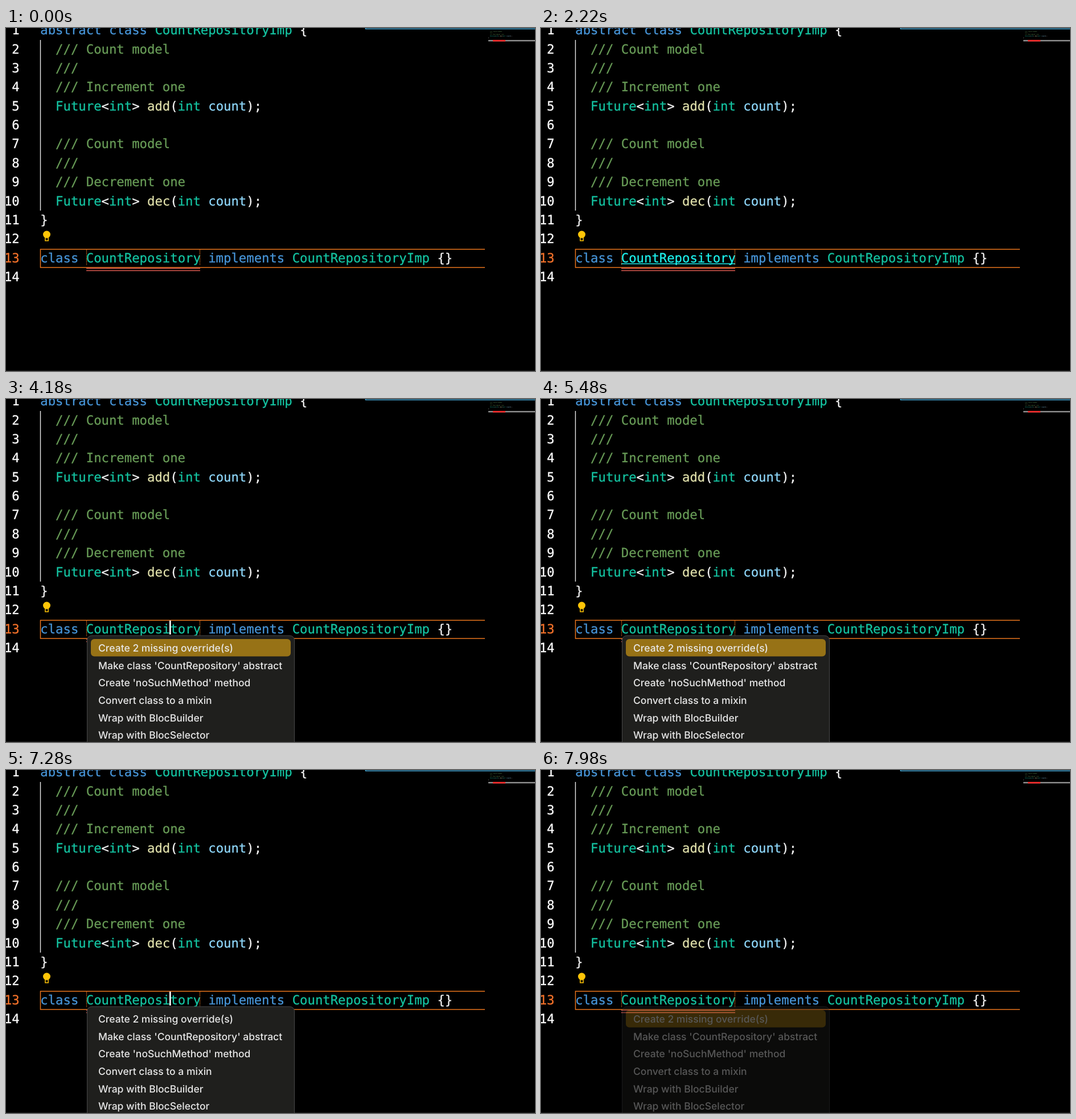
An HTML page that plays this animation: 929 px wide and 603 px high, repeating every 8 s.

```html
<!DOCTYPE html>
<html lang="en">
<head>
<meta charset="utf-8">
<title>Quick fix menu</title>
<style>
html, body { margin: 0; width: 100%; height: 100%; overflow: hidden; background: #000; }
svg { display: block; width: 929px; height: 603px; }
text { white-space: pre; text-rendering: geometricPrecision; }
text, tspan { fill: currentColor; }
.code, .mini { font-family: "DejaVu Sans Mono", monospace; color: #f2f2f2; }
.code { font-size: 22.28px; }
.code text, .code tspan { stroke: currentColor; stroke-width: .3px; }
.mini { font-size: 2.4px; }
.num { text-anchor: end; color: #fff; }
.num.current { color: #f5722a; }
.key { color: #4795d8; }
.type { color: #14c4a2; }
.note { color: #689c57; }
.func { color: #dfdfaa; }
.name { color: #8fd8fb; }
.link { color: #1df2ee; }
.items { font: 500 17.5px Inter, sans-serif; color: #e8e8e8; }

#plain, #link, #caret, #menu, #pick { animation: 8s step-end infinite; }
#plain { animation-name: plain; }
#link { animation-name: link; }
#caret { animation-name: blink; }
#menu { animation: menu 8s linear infinite; }
#pick { animation-name: flash; }

@keyframes plain { 0%, 33.75% { opacity: 1 } 5.25% { opacity: 0 } }
@keyframes link { 0%, 33.75% { opacity: 0 } 5.25% { opacity: 1 } }
@keyframes blink {
  0%, 21.6%, 56.5%, 91.6% { opacity: 0 }
  4.125%, 38.6%, 73.6% { opacity: 1 }
}
@keyframes menu {
  0%, 33.749% { opacity: 0 }
  33.75%, 93.6% { opacity: 1 }
  100% { opacity: .35 }
}
@keyframes flash { 0%, 92.5% { opacity: 1 } 90.1% { opacity: 0 } }
</style>
</head>
<body>
<svg viewBox="0 0 929 603">
  <rect width="929" height="603"/>
  <path d="M60.5 21V321" stroke="#e8e8e8" stroke-width="1.4"/>
  <path d="M631.5 0V1.5H929" fill="none" stroke="#48abd9" stroke-width="1.5"/>
  <path d="M0 602.5H929" stroke="#1c1c1c"/>

  <g id="minimap">
    <path d="M847 22.3H929" stroke="#8c8c8c" stroke-width="2.6"/>
    <path d="M855 22.3H877" stroke="#f02a2a" stroke-width="2.8"/>
  </g>

  <g id="code" class="code"></g>

  <g fill="none" stroke="#e8741c">
    <path d="M841 389.1H60.5V421.1H841" stroke-width="1.5"/>
    <path d="M141.5 390V417M340.5 390V417" stroke-width="1.3" stroke-dasharray="1.4 1.4"/>
  </g>
  <path d="M141 422.6H341M141 426.6H341" stroke="#dc5a50" stroke-width="1.5"/>

  <g id="bulb">
    <circle cx="71.5" cy="363" r="6.5" fill="#ffc507"/>
    <path d="M68.9 367.5V374H74.2V367.5" fill="none" stroke="#ffc507" stroke-width="1.5"/>
  </g>

  <rect id="caret" x="287" y="389.5" width="2.6" height="24.5" fill="#fff"/>

  <g id="menu">
    <rect x="142.5" y="416" width="364" height="210" rx="8" fill="#1f1f1d" stroke="#484848"/>
    <rect id="pick" x="149" y="422" width="351" height="30.6" rx="6" fill="#977216"/>
    <g id="items" class="items"></g>
  </g>
</svg>
<script>
const byId = id => document.getElementById(id);
const token = (kind, text) => `<tspan class="${kind}">${text}</tspan>`;
const key = text => token('key', text);
const type = text => token('type', text);
const note = text => token('note', '  /// ' + text);
const method = name =>
  `  ${type('Future')}&lt;${type('int')}&gt; ${token('func', name)}(${type('int')} ${token('name', 'count')});`;

const lines = [
  `${key('abstract class')} ${type('CountRepositoryImp')} {`,
  note('Count model'), note(''), note('Increment one'), method('add'),
  '',
  note('Count model'), note(''), note('Decrement one'), method('dec'),
  '}',
  '',
  `${key('class')}                 ${key('implements')} ${type('CountRepositoryImp')} {}`,
  ''
];

const left = 60.3, advance = 13.413, pitch = 33.38;
const baseline = row => 11.2 + row * pitch;

const rows = lines.map((line, row) => {
  const y = baseline(row);
  const current = row === 12 ? ' current' : '';
  return `<text class="num${current}" x="23.7" y="${y}">${row + 1}</text>` +
    `<text x="${left}" y="${y}">${line}</text>`;
});

// The class name has a plain and a hovered look.
const nameX = left + 6 * advance, nameY = baseline(12);
const className = (id, kind) =>
  `<text id="${id}" class="${kind}" x="${nameX}" y="${nameY}">CountRepository</text>`;
byId('code').innerHTML = rows.join('') + className('plain', 'type') +
  `<g id="link">${className('hover', 'link')}<path d="M141 414.6H341" stroke="#1df2ee" stroke-width="1.5"/></g>`;

byId('minimap').innerHTML += lines.slice(6, 11).map((line, i) =>
  `<text class="mini" x="847" y="${6.5 + i * 2.75}">${line}</text>`).join('');

byId('items').innerHTML = [
  'Create 2 missing override(s)',
  "Make class 'CountRepository' abstract",
  "Create 'noSuchMethod' method",
  'Convert class to a mixin',
  'Wrap with BlocBuilder',
  'Wrap with BlocSelector'
].map((label, i) => `<text x="162" y="${444.2 + i * 30.6}">${label}</text>`).join('');
</script>
</body>
</html>
```
